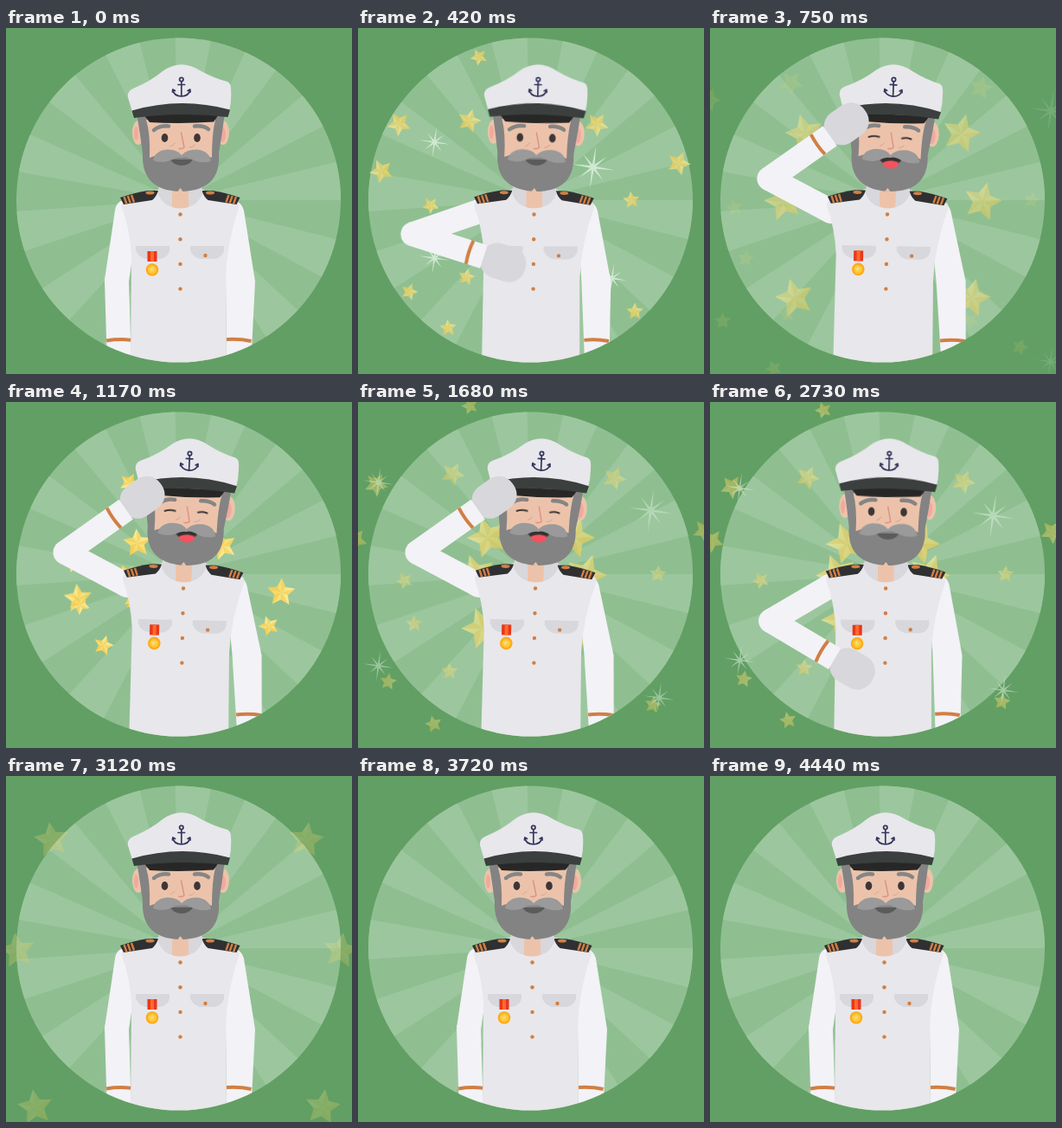
An HTML page for the animation above (4.47 s loop, 400 px wide and 400 px high).

```html
<!DOCTYPE html>
<html lang="en">
<head>
<meta charset="utf-8">
<title>Saluting captain</title>
<style>
@property --k { syntax: "<number>"; inherits: true; initial-value: 0; }
html, body { margin: 0; width: 100%; height: 100%; overflow: hidden; background: #629f64; }
svg { display: block; width: 100%; height: 100%; }

/* Light and dark sectors swap places four times per loop */
#raysA { animation: swap 1117.5ms 30ms step-end infinite; }
#raysB { opacity: 0; animation: swap 1117.5ms -528.75ms step-end infinite; }
@keyframes swap { 0% { opacity: 0; } 50%, 100% { opacity: 1; } }

/* --k is the pose: 0 at rest, 1 saluting */
#captain { animation: salute 4.47s infinite; }
@keyframes salute {
  0% { --k: 0; animation-timing-function: cubic-bezier(.333, 0, .667, 1); }
  17.2%, 53% { --k: 1; animation-timing-function: cubic-bezier(.333, 0, .667, 1); }
  68.5%, 100% { --k: 0; }
}
.torso { transform-origin: 201px 400px; transform: rotate(calc(1.1deg * var(--k))); }
.coat { transform-origin: 200px 0; transform: scaleX(calc(1 + .035 * var(--k))); }
.head { transform-origin: 203px 195px; transform: translateX(calc(3.5px * var(--k))) rotate(calc(2.6deg * var(--k))); }
.side { transform-origin: 258px 205px; transform: translate(calc(3px * var(--k)), calc(1.5px * var(--k))) rotate(calc(-3deg * var(--k))); }
.upper { transform: translate(140px, 212px) rotate(calc(98.5deg + 109.5deg * var(--k))); }
.fore { transform: translate(81px, 0) rotate(calc(-10.2deg - 233.1deg * var(--k))); }

.calm { animation: calm 4.47s step-end infinite; }
.merry { animation: merry 4.47s step-end infinite; }
@keyframes calm { 0%, 58% { opacity: 1; } 13% { opacity: 0; } }
@keyframes merry { 0%, 58% { opacity: 0; } 13% { opacity: 1; } }

.sleeve { fill: #f3f2f7; }
.cloth { fill: #e8e7eb; }
.shade { fill: #d8d7dc; }
.skin { fill: #ecc3aa; }
.hair { fill: #838383; }
.gold { fill: #d07f44; }
.trim { fill: none; stroke: #d07f44; stroke-width: 4; }
.line { fill: none; stroke-linecap: round; stroke-linejoin: round; }
</style>
</head>
<body>
<svg viewBox="0 0 400 400" preserveAspectRatio="none">
  <defs>
    <clipPath id="disc"><circle cx="199.5" cy="199" r="187.5"/></clipPath>
    <linearGradient id="shine" x1="0" y1="0" x2="1" y2="1">
      <stop offset=".2" stop-color="#fcef9c"/><stop offset="1" stop-color="#f2cc4a"/>
    </linearGradient>
    <g id="star"><path id="starBase" fill="url(#shine)"/><path id="starFacets" fill="#eabf3c" opacity=".4"/></g>
    <path id="spark" fill="#d9efda"/>
    <g id="epaulette">
      <path fill="#303033" d="M132 196Q150 190 164 188L176 188Q174 195 169 199L136 204Z"/>
      <path fill="none" stroke="#d07f44" stroke-width="2.4" d="M136.5 195L139.5 203.5M140.8 194L143.8 202.5M145 193L148 201.5"/>
      <ellipse class="gold" cx="166.5" cy="190.5" rx="5" ry="2"/>
    </g>
    <path id="flap" class="shade" d="M150 252H189V258Q186 266 178 267H162Q153 265 150 257Z"/>
  </defs>

  <rect width="400" height="400" fill="#629f64"/>
  <circle cx="199.5" cy="199" r="187.5" fill="#8fbf91"/>
  <g fill="#9cc79e" clip-path="url(#disc)"><path id="raysA"/><path id="raysB"/></g>
  <g id="sky"></g>

  <g clip-path="url(#disc)">
   <g id="captain">
    <g class="side">
      <path class="sleeve" d="M250 203L266 200Q273 203 275 211L288 293L283 392H255L254 290Z"/>
      <path class="trim" d="M255 360Q270 359 283.5 362"/>
    </g>
    <g class="upper">
      <rect class="sleeve" y="-14" width="81" height="28"/>
      <circle class="sleeve" r="14"/>
    </g>

    <g class="torso">
      <path class="cloth coat" d="M178 186L140 199Q132 201 134 208Q143 232 145 262L144 392H255L254 290Q255 250 269 208Q271 201 263 199L225 186Z"/>
      <use href="#epaulette"/>
      <use href="#epaulette" transform="matrix(-1 0 0 1 402.5 0)"/>
      <path class="skin" d="M192 180H211V207Q201 210 192 207Z"/>
      <path class="shade" d="M177 179L176 192Q181 204 192 207V188ZM226 179L227 192Q222 204 211 207V188Z"/>
      <use href="#flap"/>
      <use href="#flap" x="63"/>
      <g id="buttons" class="gold"><circle cx="230.5" cy="263" r="2.2"/></g>
      <path fill="#e8371c" d="M163.5 258H174.5V270H163.5Z"/>
      <path fill="#ff6a2c" d="M167 258H171V270H167Z"/>
      <circle cx="169" cy="279.5" r="7.3" fill="#ffab1a"/>
      <circle cx="169" cy="279.5" r="5" fill="#ffc733"/>
      <use href="#star" transform="translate(169 279.5) scale(4)"/>
    </g>

    <g class="head">
      <ellipse class="skin" cx="153" cy="121" rx="7" ry="14"/>
      <ellipse class="skin" cx="251" cy="121" rx="7" ry="14"/>
      <ellipse cx="150.5" cy="122" rx="2.5" ry="8" fill="#f0aa9d"/>
      <ellipse cx="250" cy="123" rx="4" ry="9" fill="#f0aa9d"/>
      <path class="hair" d="M151 98H253Q250 122 246 145Q249 188 202 189Q156 188 158 145Q155 122 151 98Z"/>
      <path class="skin" d="M162 106H242Q238 122 238 150Q220 141 203 149Q187 141 166 150Q167 122 162 106Z"/>
      <path class="skin" d="M198.5 189L201.5 185L204.5 189Z"/>
      <path class="line" stroke="#858585" stroke-width="4.5" d="M171 118Q178 112.5 188 113.5M218 113.5Q228 112.5 234 117"/>
      <path class="line" stroke="#df958a" stroke-width="1.6" d="M202.5 121L206 138Q204 140 200 139.5"/>
      <path class="line" stroke="#dca48e" stroke-width="1" d="M195 133Q193 136 190 137M212 138Q216 138 218 135"/>
      <g class="calm">
        <ellipse cx="183.5" cy="127" rx="3.8" ry="5" fill="#3d3636"/>
        <ellipse cx="221" cy="127" rx="3.8" ry="5" fill="#3d3636"/>
        <path fill="#5b5b5b" d="M190 152H216Q212 159 203 159Q194 159 190 152Z"/>
      </g>
      <g class="merry">
        <path class="line" stroke="#3d3636" stroke-width="2" d="M177 127Q183 125 189 126.5M215.5 127Q221 125.5 226 127.5"/>
        <path fill="#333" d="M191 153Q203 144 216 152L212 157H195Z"/>
        <path fill="#f4535d" d="M194 156Q203 151 213 155Q212 162.5 204 162.5Q196 162.5 194 156Z"/>
      </g>
      <path fill="#9a9a9b" d="M170 153Q172 142 186 140.5Q198 140 203 147Q209 140 221 140.5Q235 142 237 154Q227 157 217 153Q208 148 203 150Q197 149 190 153Q180 157 170 153Z"/>
      <path class="cloth" d="M146 97L141 80Q140 73 147 70Q168 61 181 50Q202 35 224 49Q240 58 256 62Q260 64 260 70Q261 84 258 97Z"/>
      <path fill="#272727" d="M159 100H246L240 108.5Q203 111 166 109Z"/>
      <path fill="#3b3f3e" d="M145.5 95.5Q202 79 259 94.5L256.5 103Q202 96.500 148 104Z"/>
      <g class="line" stroke="#34365c" stroke-width="1.7">
        <circle cx="202.8" cy="59.5" r="2.2"/>
        <path d="M202.8 62V78.5M199 65.5H206.6M192.8 71.5Q194 78.5 202.8 79Q211.6 78.5 212.8 71.5M192.5 74L192.8 71L195.5 72.5M213.1 74L212.8 71L210.1 72.5"/>
      </g>
    </g>

    <g class="upper"><g class="fore">
      <rect class="shade" x="83" y="-21" width="53" height="41" rx="19"/>
      <circle class="sleeve" r="14"/>
      <path class="sleeve" d="M0 -14H86V14H0Z"/>
      <path class="trim" d="M69 -14Q67 0 69 14"/>
    </g></g>
   </g>
  </g>
</svg>
<script>
const LOOP = 4470, BURST = 1080, BURSTS = 3, CX = 200, CY = 199, SECTORS = 26;
const $ = id => document.getElementById(id);
const rad = deg => deg * Math.PI / 180;
const polar = (r, deg) => [r * Math.cos(rad(deg)), r * Math.sin(rad(deg))];
const shape = pts => "M" + pts.map(p => p.map(v => v.toFixed(3)).join(" ")).join("L") + "Z";
const range = (n, fn) => Array.from({ length: n }, (_, i) => fn(i));
const clamp = v => Math.min(1, Math.max(0, v));
const mix = (a, b, u) => a + (b - a) * u;

const add = (parent, tag, attrs) => {
  const el = document.createElementNS("http://www.w3.org/2000/svg", tag);
  for (const name in attrs) el.setAttribute(name, attrs[name]);
  return parent.appendChild(el);
};

// Sector edges crowd slightly toward the left
const edge = i => {
  const a = i * 360 / SECTORS;
  const [x, y] = polar(200, 5 * (1 - Math.cos(rad(a))) - a);
  return [CX + x, CY + y];
};
const rays = first => range(SECTORS / 2, i =>
  shape([[CX, CY], edge(2 * i + first), edge(2 * i + first + 1)])).join("");
$("raysA").setAttribute("d", rays(0));
$("raysB").setAttribute("d", rays(1));

const tips = range(10, i => polar(i % 2 ? 0.49 : 1, i * 36 - 90));
$("starBase").setAttribute("d", shape(tips));
$("starFacets").setAttribute("d", range(5, i => shape([[0, 0], tips[2 * i], tips[2 * i + 1]])).join(""));
$("spark").setAttribute("d", shape(range(16, i => polar(i % 2 ? 0.15 : i % 4 ? 0.8 : 1.05, i * 22.5 - 90))));
range(4, i => add($("buttons"), "circle", { cx: 201.5, cy: 215.5 + i * 28.7, r: 2.2 }));

const sprite = id => add($("sky"), "use", { href: "#" + id });
const place = (el, [x, y], size, turn, alpha) => {
  el.setAttribute("transform", `translate(${CX + x} ${CY + y}) rotate(${turn}) scale(${Math.max(size, 0)})`);
  el.setAttribute("opacity", clamp(alpha));
};

// Two rings of small stars, by direction in degrees
const ring = (start, angles) => angles.map(angle => ({ start, angle }));
const stars = [
  ...ring(120, [191, 47, 123, 346, 143, 250, 210]),
  ...ring(60, [0, 54, 232, 130, 177, 311, 157])
].map((s, i) => ({ ...s, size: i % 3 ? 10 : 14, spin: i % 2 ? 0.06 : -0.06, tilt: i * 47, el: sprite("star") }));

const sparks = [[211, 17], [332, 24], [149, 17], [44, 17]]
  .map(([angle, size]) => ({ angle, size, el: sprite("spark") }));

// Large stars fly out in mirrored pairs
const giants = [[147, -125], [187, 3], [166, 184]].flatMap(([x, y]) =>
  [-1, 1].map(side => ({ x: x * side, y, side, el: sprite("star") })));

const fade = t => t < 420 ? mix(1, 0.72, clamp((t - 150) / 270)) : mix(0.72, 0, (t - 420) / 400);

function drawBurst(t) {
  const grow = clamp(t / 90);
  const bend = 25 * (1 - Math.pow(clamp((t - 90) / 330), 0.75));
  for (const s of stars) {
    const r = s.start * grow + 0.17 * Math.max(0, t - 90);
    const pull = Math.cos(rad(s.angle)) * (Math.sin(rad(s.angle)) > 0.2 ? -1 : 1);
    place(s.el, polar(r, s.angle + bend * pull), s.size * grow * (1 + bend / 125), s.tilt + s.spin * t, fade(t));
  }
  // Bigger sparkles lag behind
  for (const s of sparks) {
    const r = 0.42 * (t - 110) - 7 * (s.size - 17);
    place(s.el, polar(Math.max(0, r), s.angle), s.size * clamp(r / 60), 8, fade(t) * 1.2);
  }
  const out = Math.max(0, (t - 415) / 545);
  for (const g of giants) {
    place(g.el, [g.x * out, g.y * out], clamp(out * 4) * mix(26, 21, out), g.side * (8 - (t - 960) * 0.03), mix(0.85, 0.25, out));
  }
}

let start;
function frame(now) {
  start ??= now;
  const t = (now - start) % LOOP;
  drawBurst(t < BURSTS * BURST ? t % BURST : 0);
  requestAnimationFrame(frame);
}
drawBurst(0);
requestAnimationFrame(frame);
</script>
</body>
</html>
```
